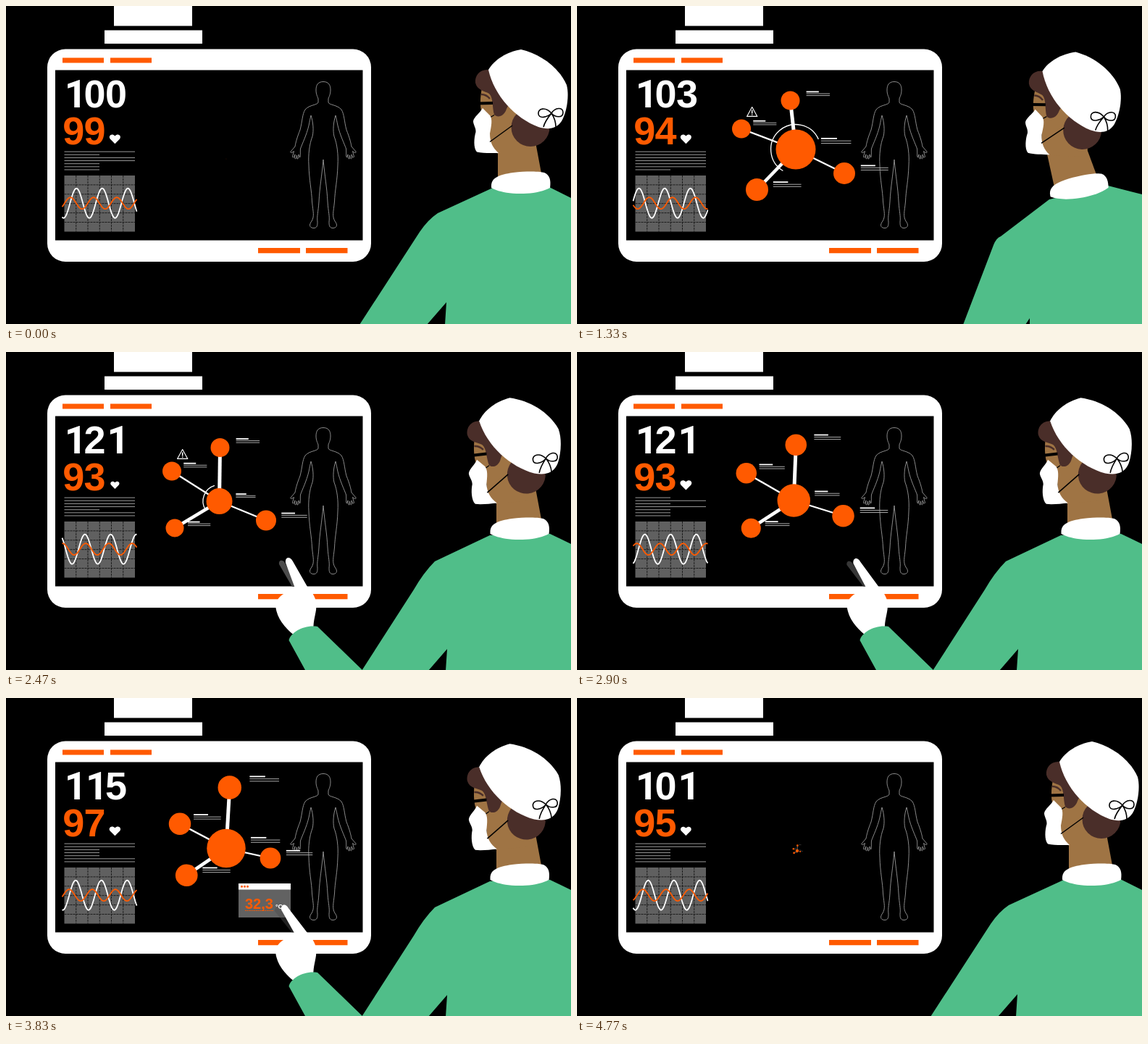
An HTML page for the animation above (4810 ms loop, 780 px wide and 439 px high).

```html
<!DOCTYPE html>
<html lang="en">
<head>
<meta charset="utf-8">
<title>Health monitor</title>
<style>
  html, body { margin: 0; width: 100%; height: 100%; overflow: hidden; background: #000; }
  svg { display: block; width: 100%; height: 100%; }
  text { font-family: "Liberation Sans", Arial, sans-serif; font-weight: bold; }
  .one { font-family: Roboto, sans-serif; }
</style>
</head>
<body>
<svg viewBox="0 0 780 439">
  <defs>
    <path id="half" d="M438,104.5C430,104.5 428,110 428,116C428,122 430,125 431,128L431,133C430,137 419,136 413,143C409,149 409,160 406,171C402,181 400,188 399,194L393,201C392,203 395,203 397.500,200.500L395.500,208C396,210 398,209 399,205L398.500,210C400,212 401,210 401.500,206L402,211C404,211 404,208 404,205L405.500,209C407,208 406,202 406.500,197C409,190 415,178 418,165C419,160 420,155 421,151C424,160 425,172 423,180C419,190 417,205 418,220C418.500,240 422,255 422.500,270C424,285 426,290 422,297C418,302 419,306 424,306.500C430,307 430,302 430,298C429,290 431,285 432,270C433,250 436,235 438,212"/>
  </defs>
  <rect width="780" height="439"/>
  <g fill="#fff">
    <path d="M149,0H257V27.500H149ZM136,33.500H271V52H136Z"/>
    <rect x="57" y="59.500" width="447" height="293.500" rx="25"/>
  </g>
  <rect x="68" y="88.500" width="424.500" height="235"/>
  <path fill="#ff5a00" d="M78,71.500h57v7h-57zM144,71.500h57v7h-57zM348,334h58v7.200h-58zM414,334h57.500v7.200h-57.500z"/>
  <g fill="none" stroke="#999" stroke-width=".9">
    <use href="#half"/>
    <use href="#half" transform="matrix(-1 0 0 1 876 0)"/>
  </g>
  <g id="vitals"></g>
  <rect x="80.500" y="234" width="97.500" height="77.500" fill="#606060"/>
  <path id="grid" stroke="#1c1c1c" stroke-dasharray="3 1"/>
  <g id="waves" fill="none" stroke-width="1.800"></g>
  <g id="molecule"></g>
  <g id="popup"></g>
  <g id="doctor"></g>
  <g id="hand"></g>
</svg>
<script>
const LOOP = 4810, ORANGE = '#ff5a00', GREEN = '#50be89', HAIR = '#4a2e29', SKIN = '#9f7444';
const $ = id => document.getElementById(id);
const n = v => v.toFixed(2);
const clamp = v => Math.max(0, Math.min(1, v));
const part = (t, a, b) => clamp((t - a) / (b - a));
const linear = p => p;
const smooth = p => p * p * (3 - 2 * p);
const cubic = p => p < .5 ? 4 * p ** 3 : 1 - 4 * (1 - p) ** 3;
const outCubic = p => 1 - (1 - p) ** 3;
const backOut = p => 1 + 2.7 * (p - 1) ** 3 + 1.7 * (p - 1) ** 2;

// Rows are [time, ...values]
function track(t, rows, ease = smooth) {
  let i = 0;
  while (i < rows.length - 2 && t >= rows[i + 1][0]) i++;
  const a = rows[i], b = rows[i + 1], p = ease(part(t, a[0], b[0]));
  return a.slice(1).map((v, k) => v + (b[k + 1] - v) * p);
}
const step = (t, rows) => rows.filter(r => r[0] <= t).pop();

let grid = '';
for (let i = 1; i < 6; i++) {
  grid += `M${80.5 + i * 16.25},234v77.5M80.5,${234 + i * 12.9}h97.5`;
}
$('grid').setAttribute('d', grid);

const pulse = t => track(t, [[0, 0], [1330, 1330], [2470, 2670], [LOOP, 5010]], linear)[0];

const READINGS = [[0, '100', '99'], [1000, '103', '94'], [2000, '121', '93'], [3000, '115', '97'], [4000, '101', '95']];
const ROWS = [[0, 'LSLLSSS'], [300, 'LSLLLSL'], [930, 'LLLLLLS'], [1900, 'LLLLSLL'],
  [2900, 'SLSLSSS'], [3830, 'LLSSSLL'], [4600, 'LLSSSSL']];

function bigNumber(str, y, color) {
  return [...str].map((c, i) => {
    const one = c === '1';
    return `<text x="${n(93.2 + i * 29.4 + (one ? 3 : 0))}" y="${y}" font-size="54" text-anchor="middle" fill="${color}"${one ? ' class="one"' : ''}>${c}</text>`;
  }).join('');
}

function drawVitals(t) {
  const [, top, low] = step(t, READINGS);
  const beat = .89 + .12 * Math.cos((pulse(t) - 160) / 1000 * 2 * Math.PI);
  const lines = [...step(t, ROWS)[1]].map((c, i) =>
    `<rect x="80.5" y="${n(200.6 + i * 4.15)}" width="${c === 'L' ? 97.5 : 48.5}" height="1" fill="#999"/>`).join('');
  $('vitals').innerHTML = bigNumber(top, 140, '#fff') + bigNumber(low, 191, ORANGE) +
    `<path transform="translate(150.4 183.5) scale(${n(beat)})" fill="#fff" d="M0,7L-7,0C-10,-4 -5,-9 0,-4.300C5,-9 10,-4 7,0Z"/>` + lines;
}

function wave(peak, period, amp, color) {
  let d = '';
  for (let x = 77.5; x <= 180.5; x += 1) {
    d += (d ? 'L' : 'M') + x + ',' + n(272.2 - amp * Math.cos((x - peak) / period * 2 * Math.PI));
  }
  return `<path d="${d}" stroke="${color}"/>`;
}

function drawWaves(t) {
  const s = pulse(t) / 1000;
  $('waves').innerHTML = wave(97.3 - 35.5 * s, 35.5, 20.5, '#fff') + wave(121 - 64 * s, 32, 8, ORANGE);
}

// Each node: position and radius over time, then label offset, label width (in radii), link width
const NODES = [
  { at: [[530, 304, 204, 29], [1330, 302, 198, 27.5], [2470, 294.5, 206, 18], [3330, 304, 204, 27.5], [4330, 304, 211, 26]], label: [1.27, -.55, 1.51] },
  { at: [[530, 304, 133, 15.5], [1330, 294.5, 130.5, 13], [2470, 295.5, 132, 13], [3330, 309, 124.5, 16.5], [4330, 308.5, 122.5, 16]], label: [1.7, -.93, 2.5], link: 5 },
  { at: [[530, 247, 165, 16], [1330, 227, 169.5, 13], [2470, 229, 164.5, 13], [3330, 238.5, 170, 15.5], [4330, 241.5, 177.5, 15]], label: [1.25, -.83, 2.47], link: 2.3 },
  { at: [[530, 358.5, 223.5, 13.2], [1330, 369, 231, 15], [2470, 359, 232.5, 14], [3330, 376, 220, 16.5], [4330, 354, 222, 12.3]], label: [1.52, -.71, 2.53], link: 2.3 },
  { at: [[530, 234.5, 260, 13.5], [1330, 248.5, 253.5, 15.5], [2470, 233, 243, 12.5], [3330, 247.5, 243.5, 14.5], [4330, 251, 246, 16.2]], label: [1.44, -.67, 2.5], link: 4.6 }
];

function label([x, y, r], [dx, dy, w]) {
  x += dx * r; y += dy * r; w *= r;
  const bar = (k, len, h, c) => `<rect x="${n(x)}" y="${n(y + k * w - h / 2)}" width="${n(len)}" height="${h}" fill="${c}"/>`;
  return bar(0, w * .53, 1.8, '#fff') + bar(.08, w, 1, '#aaa') + bar(.16, w, 1, '#aaa');
}

function arc(t, [x, y, r]) {
  const [mid, span] = track(t, [[0, -60, 0], [530, 48, 196], [1330, 228, 215], [2470, 561, 104], [2900, 660, 0]], linear);
  if (span < 1) return '';
  const R = r * 1.25;
  const pt = deg => {
    const a = deg * Math.PI / 180;
    return n(x + R * Math.cos(a)) + ',' + n(y + R * Math.sin(a));
  };
  return `<path d="M${pt(mid - span / 2)}A${n(R)},${n(R)} 0 ${span > 180 ? 1 : 0} 1 ${pt(mid + span / 2)}" fill="none" stroke="#fff" stroke-width="1.3"/>`;
}

function warning(t, [x, y, r]) {
  if (t > 2900) return '';
  return `<g transform="translate(${n(x + 1.13 * r)} ${n(y - 1.78 * r)}) scale(${n(r / 16)})" fill="none" stroke="#fff" stroke-width="1.4" stroke-linejoin="round">
    <path d="M0,-8.500L8.800,7.500H-8.800Z"/><path d="M0,-3.500V2.500M0,4V5.500" stroke-width="1.900"/></g>`;
}

function drawMolecule(t) {
  const scale = t < 2000 ? outCubic(part(t, 0, 470)) : 1 - part(t, 4340, 4790) ** 2;
  const g = $('molecule');
  g.setAttribute('transform', `translate(304 211) scale(${scale.toFixed(4)}) translate(-304 -211)`);
  const p = NODES.map(o => track(t, o.at));
  const hub = p[0];
  const links = p.slice(1).map((q, i) =>
    `<line x1="${n(hub[0])}" y1="${n(hub[1])}" x2="${n(q[0])}" y2="${n(q[1])}" stroke="#fff" stroke-width="${NODES[i + 1].link}"/>`);
  const discs = p.map(q => `<circle cx="${n(q[0])}" cy="${n(q[1])}" r="${n(q[2])}" fill="${ORANGE}"/>`);
  const labels = p.map((q, i) => label(q, NODES[i].label));
  g.innerHTML = scale > 0 ? [...links, ...discs, ...labels, arc(t, hub), warning(t, p[2])].join('') : '';
}

function drawPopup(t) {
  const g = $('popup');
  const grow = backOut(part(t, 3050, 3270));
  const out = part(t, 4300, 4450);
  if (t < 3060 || out === 1) { g.innerHTML = ''; return; }
  const sx = grow * (1 - out);
  const sy = grow * (out < .2 ? 1 + .95 * out : 1.19 * (1 - out) / .8);
  const value = track(t, [[3050, 6.6], [3330, 15.8], [4000, 37.9]], linear)[0];
  const shown = value.toFixed(1).replace('.', ',').replace(/1/g, '<tspan class="one">1</tspan>');
  const color = t < 4000 ? ORANGE : '#fff';
  g.setAttribute('transform', `translate(357 256) scale(${n(sx)} ${n(sy)})`);
  g.innerHTML = `<rect x="-36" width="72" height="47" fill="#626262"/><rect x="-36" width="72" height="8.5" fill="#fff"/>` +
    [-31.5, -27.5, -23.5].map(x => `<circle cx="${x}" cy="4.3" r="1.5" fill="${ORANGE}"/>`).join('') +
    `<text x="-27" y="35" font-size="20" fill="${color}">${shown}</text>
     <path d="M-27,37.500H13" stroke="${color}" stroke-dasharray="1.500 1"/>
     <text x="15" y="34.500" font-size="9" fill="#fff">°C</text>`;
}

// Head shift and tilt, neck corners, collar shift and tilt, body outline
const UPRIGHT = [0, 0, 0, 679, 195, 731, 188, 679, 240, 740, 236, 0, 0, 0,
  488, 571, 312, 596, 286, 672, 251, 750, 250, 265, 581, 608, 409, 606];
const LEAN = [-25, 3.5, 2, 648, 200, 702, 192, 659, 250, 719, 238, -18, 6, -9,
  533, 575, 330, 585, 318, 652, 267, 733, 248, 260, 619, 625, 431, 625];
const POINT = [-9.1, 2.9, -5.3, 677, 200, 731, 188, 677, 240, 740, 236, -1.5, 0, 0,
  491, 563, 328, 592, 289, 668, 253, 751, 251, 265, 583, 609, 410, 607];
const POSES = [[0, ...UPRIGHT], [1330, ...LEAN], [1480, ...LEAN], [2130, ...POINT], [4300, ...POINT], [4765, ...UPRIGHT]];

const HEAD = `
  <path fill="${SKIN}" d="M658,108C655,122 654,134 656,144L668,152V190L679,204H731L736,150L700,100L670,90Z"/>
  <circle cx="724" cy="167.500" r="26.500" fill="${HAIR}"/>
  <path fill="${HAIR}" d="M666,88C654,87 647,96 648,106C650,116 660,117 667,121C673,127 671,140 674,150C679,155 688,152 691,142L696,132L680,98Z"/>
  <path fill="none" stroke="${HAIR}" stroke-width="2.500" d="M656,122Q663,122 668,128"/>
  <path fill="none" stroke="#000" stroke-width="4" d="M652.500,134.500L672,134"/>
  <path fill="none" stroke="#000" stroke-width="1.300" d="M654,128V137M668,154L674,150.500"/>
  <path fill="#fff" d="M658,141C654,148 646,153 645,159C645,164 649,168 648.500,174C646,182 645,196 650,201.500C658,203.500 670,203 680,203C672,196 668,188 668,176C670,166 672,156 668,151Z"/>
  <path fill="none" stroke="#000" stroke-width="1.500" d="M668,187.500L699,165"/>
  <path fill="#fff" d="M666,88C674,74 692,63 711,60C737,66 763,84 774,109C778,124 774,147 767,159C760,170 748,171 735,167C703,155 674,124 666,88Z"/>
  <path fill="none" stroke="#000" stroke-width="1.600" d="M753,148C745,139 734,141 735,149C736,156 747,154 753,148C758,140 769,139 769,147C769,155 758,154 753,148C749,153 744,159 742,167M753,148C757,154 759,160 759,167"/>`;

function drawDoctor(t) {
  const v = track(t, POSES, cubic).map(x => +n(x));
  const [hx, hy, ha, ax, ay, bx, by, cx, cy, dx, dy, kx, ky, ka] = v;
  const [x0, x1, y1, x2, y2, x3, y3, x4, y4, y5, g0, g1, h1, g2] = v.slice(14);
  $('doctor').innerHTML = `
    <path fill="${GREEN}" d="M${x0},440L${x1},${y1}Q${(x1 + x2) / 2 - 1},${(y1 + y2) / 2 - 4} ${x2},${y2}L${x3},${y3}L${x4},${y4}L780,${y5}V440H${g2}L${g1},${h1}L${g0},440Z"/>
    <path fill="${SKIN}" d="M${ax},${ay}L${bx},${by}L${dx},${dy}L${cx},${cy}Z"/>
    <path fill="#fff" transform="translate(${kx} ${ky}) rotate(${ka} 711 244)" d="M670,247C671,237 680,233 700,230C720,228 739,228 745,231C752,235 752,244 751,251C740,257 725,259 710,259C692,259 679,256 670,251Z"/>
    <g transform="translate(${hx} ${hy}) rotate(${ha} 711 130)">${HEAD}</g>`;
}

function drawHand(t) {
  const g = $('hand');
  if (t < 1650 || t > 4740) { g.innerHTML = ''; return; }
  const away = t < 3000 ? 1 - outCubic(part(t, 1650, 2130)) : part(t, 4345, 4740) ** 2;
  // Fingertip shift, palm shift, visibility of the finger's shade
  const [tx, ty, px, shade] = track(t, [[2470, 0, 0, 0, 1], [3000, -5, 1, .5, .7], [3700, -5, 1, .5, .5], [4330, -12.5, 5, -4.7, 0]]);
  const X = x => n(x + tx), Y = y => n(y + ty), P = x => n(x + px);
  g.setAttribute('transform', `translate(${n(away * 25)} ${n(away * 165)})`);
  g.innerHTML = `
    <path fill="#4c4c4c" opacity="${n(shade)}" d="M${X(377)},${Y(293)}C${X(376)},${Y(287)} ${X(382)},${Y(286)} ${X(385)},${Y(291)}L${P(402)},324H${P(395)}Z"/>
    <path fill="#fff" d="M${X(386)},${Y(291)}C${X(385)},${Y(283)} ${X(392)},${Y(281.5)} ${X(396)},${Y(289)}L${P(416)},324C${P(424)},333 ${P(429)},341 ${P(428.5)},351C${P(428)},362 ${P(424)},370 ${P(424.5)},383L${P(402)},394C${P(390)},386 ${P(377)},372 ${P(373.5)},358C${P(370)},347 ${P(375)},338 ${P(385)},333L${P(399)},326Z"/>
    <path fill="${GREEN}" d="M390.500,398C393,387 412,376 430,379L492,439L560,630H500L413,439Z"/>`;
}

function render(t) {
  drawVitals(t);
  drawWaves(t);
  drawMolecule(t);
  drawPopup(t);
  drawDoctor(t);
  drawHand(t);
}

const start = performance.now();
function frame(now) {
  render(Math.max(0, now - start) % LOOP);
  requestAnimationFrame(frame);
}
render(0);
requestAnimationFrame(frame);
</script>
</body>
</html>
```
